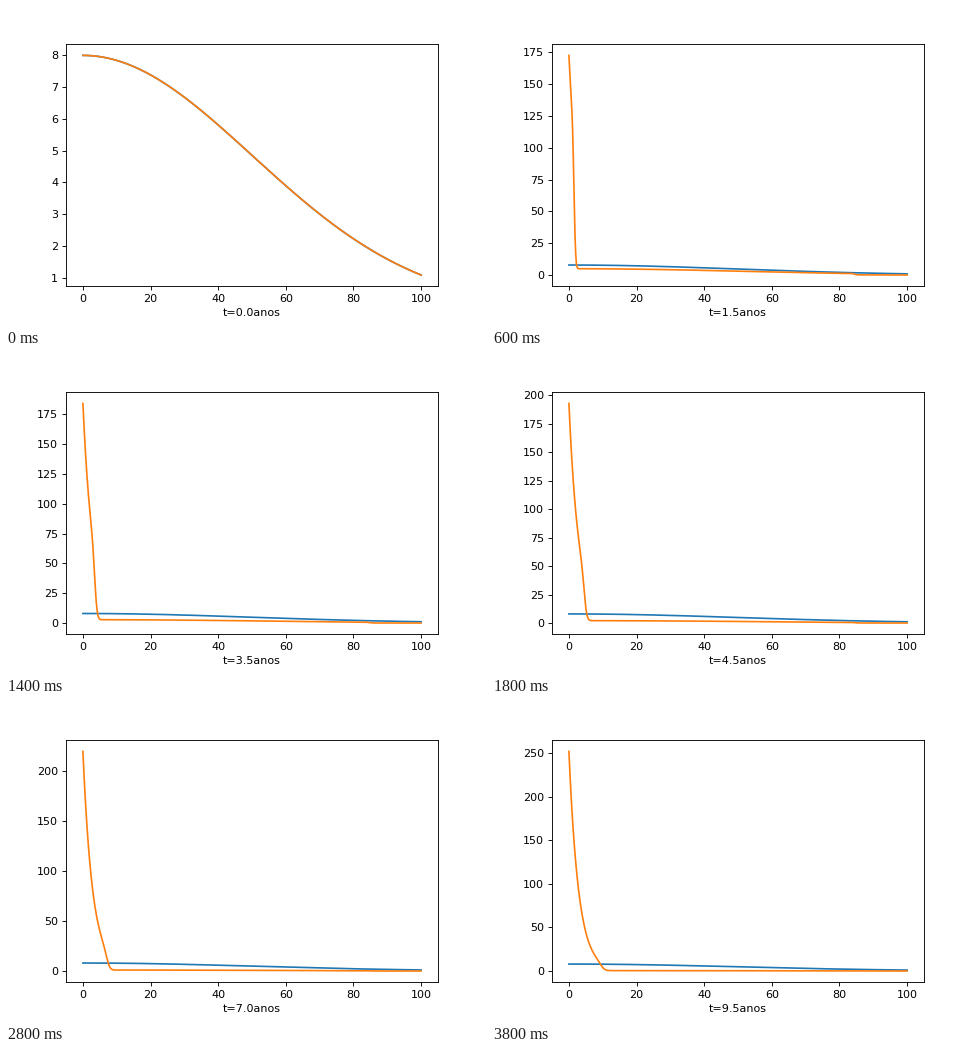
These frames come from a looping animation (480x320 px, 4 s). A matplotlib script:

```python
import numpy as np
import matplotlib.pyplot as plt
from matplotlib.animation import FuncAnimation

FRAMES = 20
STEP_YEARS = 0.5
DA, DT = 0.1, 0.01       # age and time steps
MU = 0.3                 # base mortality
OLD_AGE, MU_OLD = 84, 1.0

plt.rcParams.update({
    "font.family": "DejaVu Sans",
    "font.size": 10,
    "figure.subplot.bottom": 0.125,
})

ages = np.linspace(0, 100, 1001)
initial = 8 * np.exp(-ages**2 / 5000)
mortality = MU + MU_OLD * (ages >= OLD_AGE)


def births(t):
    """Newborn density: steady growth plus fading transients."""
    fading = 14.6 * np.exp(-0.33 * t) + 13.2 * np.exp(-0.8 * t)
    return (145.2 + fading) * np.exp(0.0575 * t)


def simulate():
    """Age the population with an upwind scheme, one profile per frame."""
    u = initial.copy()
    profiles = [u.copy()]
    per_frame = round(STEP_YEARS / DT)
    for n in range(1, per_frame * (FRAMES - 1) + 1):
        u[1:] -= DT * (np.diff(u) / DA + mortality[1:] * u[1:])
        u[0] = births(n * DT)
        if n % per_frame == 0:
            profiles.append(u.copy())
    return profiles


profiles = simulate()
fig, ax = plt.subplots(figsize=(6, 4), dpi=80)


def draw(i):
    ax.clear()
    ax.plot(ages, initial, color="C0")
    ax.plot(ages, profiles[i], color="C1")
    ax.set_xlabel(f"t={i * STEP_YEARS:.1f}anos")


anim = FuncAnimation(fig, draw, frames=FRAMES, interval=200, repeat=True)
plt.show()
```
